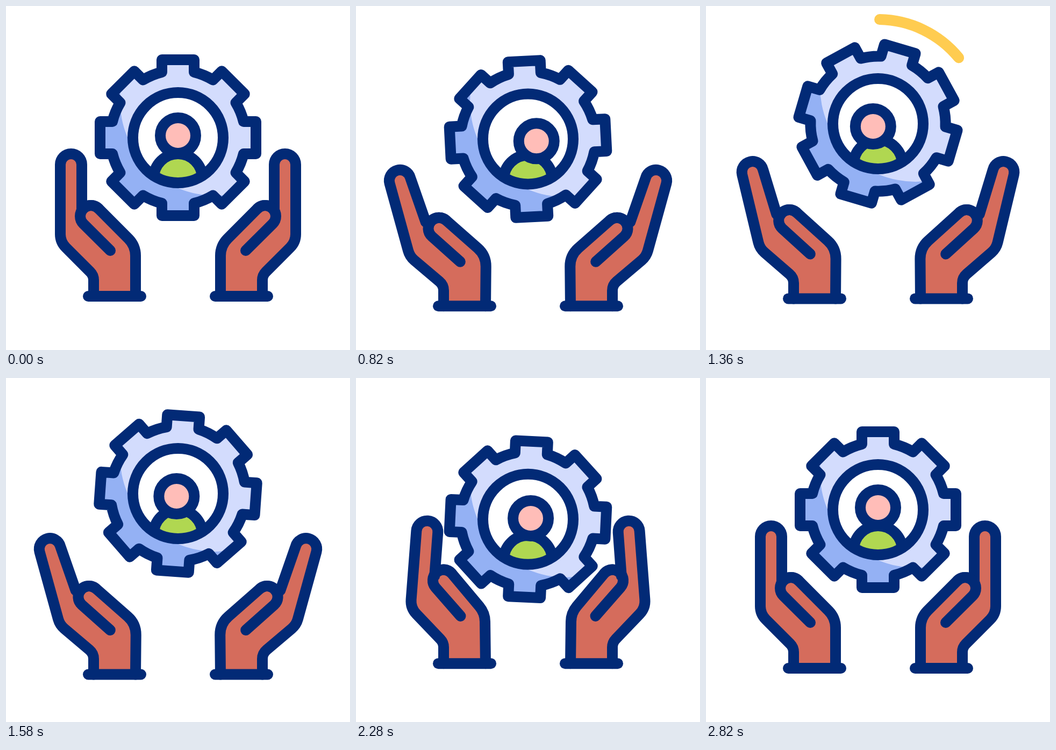
An HTML page with a canvas that plays this animation: 640 px wide and 640 px high, repeating every 3000 ms.

```html
<!DOCTYPE html>
<html lang="en">
<head>
<meta charset="utf-8">
<title>Hands and gear</title>
<style>
html, body { margin: 0; width: 100%; height: 100%; overflow: hidden; background: #fff; }
canvas { display: block; width: 640px; height: 640px; }
</style>
</head>
<body>
<canvas id="stage" width="640" height="640"></canvas>
<script>
const ctx = document.getElementById('stage').getContext('2d');
const LOOP = 3000;
const NAVY = '#022a76', SKIN = '#d56c5c', LIGHT = '#d3dcfd', SHADE = '#94b1f4';
const PINK = '#ffbdb8', GREEN = '#b0d751', YELLOW = '#ffcc50';
const rad = deg => deg * Math.PI / 180;

// Smooth monotone curve through [time, value] keys, flat at the ends and at extremes.
function track(...keys) {
  const slope = i => (keys[i + 1][1] - keys[i][1]) / (keys[i + 1][0] - keys[i][0]);
  const tangents = keys.map((_, i) => {
    if (i === 0 || i === keys.length - 1) return 0;
    const a = slope(i - 1), b = slope(i);
    return a * b > 0 ? 2 * a * b / (a + b) : 0;
  });
  return t => {
    if (t <= keys[0][0]) return keys[0][1];
    const i = keys.findIndex(k => k[0] > t) - 1;
    if (i < 0) return keys[keys.length - 1][1];
    const [t0, v0] = keys[i], [t1, v1] = keys[i + 1];
    const h = t1 - t0, u = (t - t0) / h, w = 1 - u;
    return v0 * w * w * (1 + 2 * u) + v1 * u * u * (3 - 2 * u)
      + h * u * w * (tangents[i] * w - tangents[i + 1] * u);
  };
}

const gearY = track([220, 245], [510, 264], [820, 247.5], [1140, 225.5], [1320, 220], [1580, 215],
  [1800, 213.5], [1880, 218.5], [2300, 263], [2620, 242.5], [2820, 245]);
const gearTurn = track([220, 0], [750, -10], [1610, 366], [1830, 369], [2540, 360]);
const headX = track([220, 0], [870, 16], [1420, -10], [1880, 16], [2520, 0]);
const headY = track([220, -4], [850, 4], [1580, 5], [1880, 4], [2520, -4]);
const handDrop = track([220, 0], [500, -9], [950, 25], [1400, 4], [1850, 25], [2300, -9], [2620, 1], [2820, 0]);
const fingerTilt = track([220, 0], [500, -4.5], [930, 19], [1400, 13.2], [1850, 19], [2300, -4.5], [2620, 0.4], [2820, 0]);
const palmTilt = track([220, 0], [500, -4], [930, 4.4], [1400, 2.4], [1850, 4.4], [2300, -4], [2620, 0.2], [2820, 0]);
const sweepHead = track([1030, 0], [1550, 254]);
const sweepTail = track([1150, 0], [1570, 254]);

// Counter-clockwise turn of an offset, placed at an origin.
function turned([ox, oy], x, y, deg, scale = 1) {
  const c = Math.cos(rad(deg)) * scale, s = Math.sin(rad(deg)) * scale;
  return [ox + x * c + y * s, oy - x * s + y * c];
}

function disc(x, y, r, fill) {
  ctx.beginPath();
  ctx.arc(x, y, r, 0, 2 * Math.PI);
  ctx.fillStyle = fill;
  ctx.fill();
}

function gearPath(deg) {
  const path = new Path2D();
  const base = Math.hypot(30, 122), half = Math.atan2(30, 122);
  for (let i = 0; i < 8; i++) {
    const a = rad(deg + i * 45 - 90);
    const c = Math.cos(a), s = Math.sin(a);
    path.arc(0, 0, base, a - Math.PI / 4 + half, a - half);
    path.lineTo(145 * c + 30 * s, 145 * s - 30 * c);
    path.lineTo(145 * c - 30 * s, 145 * s + 30 * c);
    path.lineTo(122 * c - 30 * s, 122 * s + 30 * c);
  }
  path.closePath();
  return path;
}

function drawGear(t) {
  const path = gearPath(gearTurn(t));
  ctx.fillStyle = LIGHT;
  ctx.fill(path);
  ctx.save();
  ctx.clip(path);
  ctx.beginPath();
  ctx.rect(-300, -300, 600, 600);
  ctx.arc(70, -70, 178, 0, 2 * Math.PI);
  ctx.fillStyle = SHADE;
  ctx.fill('evenodd');
  ctx.restore();
  ctx.stroke(path);
  disc(0, 0, 84, '#fff');
}

function drawPerson(t) {
  ctx.save();
  ctx.beginPath();
  ctx.arc(0, 0, 84, 0, 2 * Math.PI);
  ctx.clip();
  disc(0, 75, 45, GREEN);
  ctx.stroke();
  disc(headX(t), headY(t), 33, PINK);
  ctx.stroke();
  ctx.restore();
  ctx.beginPath();
  ctx.arc(0, 0, 84, 0, 2 * Math.PI);
  ctx.stroke();
}

function drawSweep(t) {
  const from = sweepTail(t), to = sweepHead(t);
  if (to - from < 0.5) return;
  ctx.beginPath();
  ctx.arc(0, 0, 194, rad(143 + from), rad(143 + to));
  ctx.strokeStyle = YELLOW;
  ctx.stroke();
  ctx.strokeStyle = NAVY;
}

function drawHand(t) {
  const drop = handDrop(t), tilt = fingerTilt(t), bend = palmTilt(t);
  const pivot = [241, 460 + drop];
  const shrink = 1 - 0.0015 * Math.max(tilt, 0);
  const knee = turned(pivot, -140, -21, tilt * 0.23);
  const onFinger = (x, y) => turned(knee, x, y, tilt, shrink);
  const tip = onFinger(20, -144);
  const thumb = turned(pivot, -83, -69, bend);
  const crease = turned(pivot, -47, -5, bend);
  const inner = onFinger(40, -59), outer = turned(pivot, -100, -80, bend);
  const joint = [(inner[0] + outer[0]) / 2, (inner[1] + outer[1]) / 2];
  const thumbArc = from => ctx.arc(...thumb, 20, rad(from - bend), rad(315 - bend));

  ctx.beginPath();
  ctx.moveTo(163, 540 + drop);
  ctx.arcTo(163, 501 + drop, ...knee, 22);
  ctx.arcTo(...knee, ...turned(tip, -20, 0, tilt), 35);
  ctx.arc(...tip, 20, rad(180 - tilt), rad(360 - tilt));
  ctx.lineTo(...joint);
  thumbArc(210);
  ctx.arcTo(241 + bend * 0.3, 446 + drop, 241, 540 + drop, 45);
  ctx.lineTo(241, 540 + drop);
  ctx.fillStyle = SKIN;
  ctx.fill();
  ctx.stroke();

  ctx.beginPath();
  ctx.moveTo(...crease);
  thumbArc(135);
  ctx.stroke();

  ctx.beginPath();
  ctx.moveTo(153, 540 + drop);
  ctx.lineTo(251, 540 + drop);
  ctx.stroke();
}

function draw(t) {
  ctx.fillStyle = '#fff';
  ctx.fillRect(0, 0, 640, 640);
  ctx.lineWidth = 20;
  ctx.lineCap = ctx.lineJoin = 'round';
  ctx.strokeStyle = NAVY;

  ctx.save();
  ctx.translate(320, gearY(t));
  drawSweep(t);
  drawGear(t);
  drawPerson(t);
  ctx.restore();

  drawHand(t);
  ctx.save();
  ctx.translate(640, 0);
  ctx.scale(-1, 1);
  drawHand(t);
  ctx.restore();
}

const start = performance.now();
function frame() {
  draw((performance.now() - start) % LOOP);
  requestAnimationFrame(frame);
}
frame();
</script>
</body>
</html>
```
